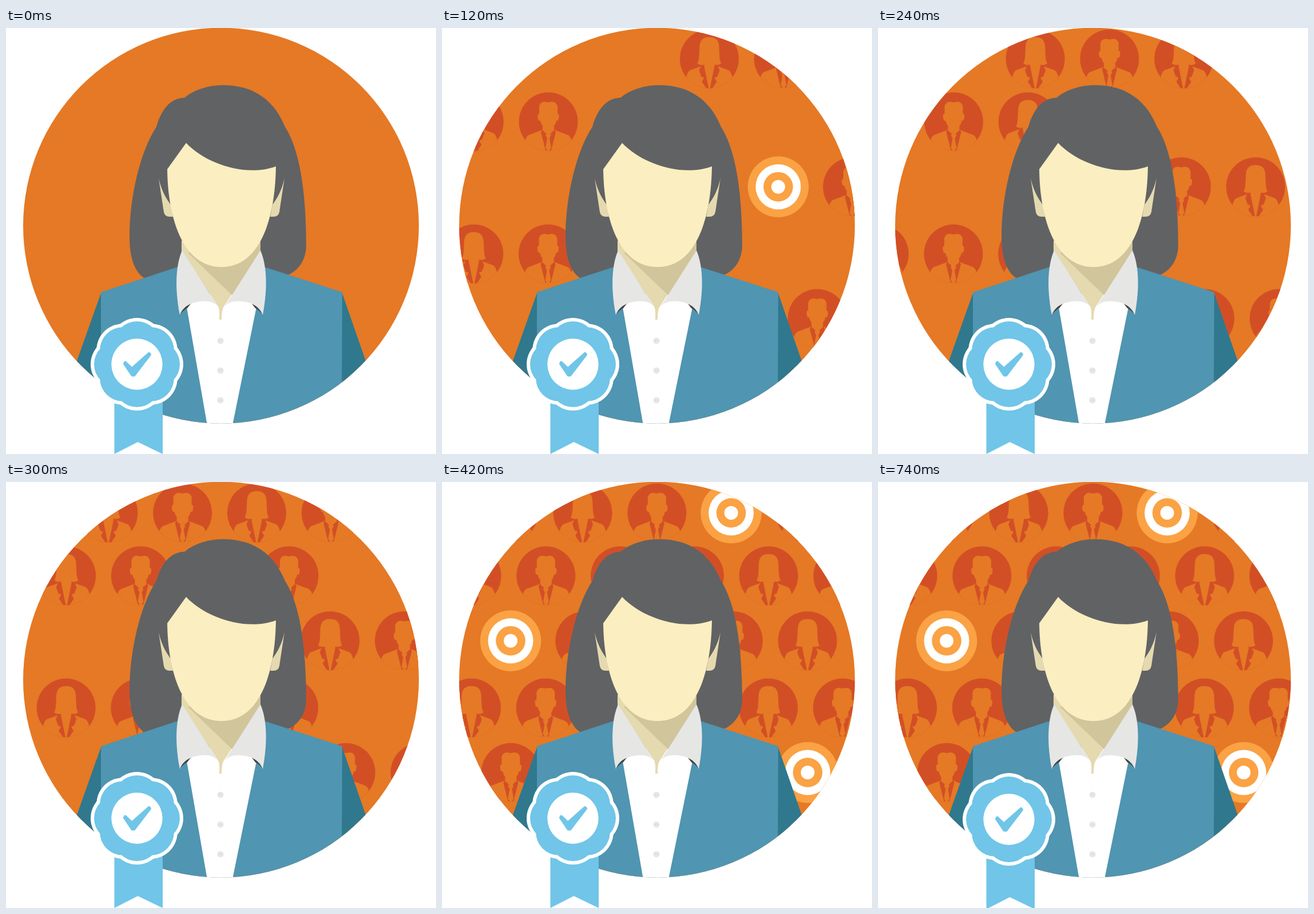
An HTML page with a canvas for the animation above (970 ms loop, 752 px wide and 745 px high).

```html
<!DOCTYPE html>
<html lang="en">
<head>
<meta charset="utf-8">
<title>Verified profile</title>
<style>
html, body { margin: 0; width: 100%; height: 100%; overflow: hidden; background: #fff; }
canvas { display: block; }
</style>
</head>
<body>
<canvas id="stage" width="752" height="745"></canvas>
<script>
const ctx = document.getElementById('stage').getContext('2d');
const LOOP = 970, STEP = 30, SLIDE_STEPS = 14, BOUNCE_START = 590, SPACING = 129.8;
const ORANGE = '#e57925', RED = '#d24f26', AMBER = '#faa244', SKY = '#70c5e8';
const HAIR = '#616264', SKIN = '#fbeec0', SHADE = '#e5d9af', DEEP_SHADE = '#d1c59c';
const BLAZER = '#5095b1', SLEEVE = '#30788e', COLLAR = '#e6e6e5';

// Resting x of the first icon, and travel still to go per step.
const rows = [
  { y: 54, x: -13.5, travel: 48.1, icons: 'wmwmtw' },
  { y: 164, x: 52, travel: -51.5, icons: 'wmwmwm' },
  { y: 277.7, x: 120, travel: 46.8, icons: 'tmwmwm' },
  { y: 395, x: 51.5, travel: -51.5, icons: 'wmwmwm' },
  { y: 508, x: -9.5, travel: 53.6, icons: 'wmwmwt' }
];
const bounce = [-4, -7, -10, -6, -2, 2];

function shape(color, d) {
  ctx.fillStyle = color;
  ctx.fill(new Path2D(d));
}

function disc(color, x, y, r) {
  ctx.fillStyle = color;
  ctx.beginPath();
  ctx.arc(x, y, r, 0, Math.PI * 2);
  ctx.fill();
}

function mirrored(axis, draw) {
  draw();
  ctx.save();
  ctx.translate(axis * 2, 0);
  ctx.scale(-1, 1);
  draw();
  ctx.restore();
}

function man() {
  mirrored(0, () => {
    shape(ORANGE, 'M-1 -34Q-13 -38 -16 -27L-16 -14Q-20 -14 -18 -5Q-17 -1 -14 -2Q-13 4 -10 7L-10 14L-34 23Q-39 25 -41 35L-41 60H1V-34Z');
  });
  shape(RED, 'M-11 14L0 24L11 14L13 18L5 50H-5L-13 18Z');
  shape(ORANGE, 'M0 18L5 23L2 29L5 46L0 52L-5 46L-2 29L-5 23Z');
}

function woman() {
  mirrored(0, () => {
    shape(ORANGE, 'M1 -38Q-16 -39 -17 -22C-18 -8 -17 2 -21 8Q-16 12 -9 10L-9 14L-1 52H1Z');
    shape(ORANGE, 'M-15 13L-34 20Q-38 22 -41 34V60H1V51L-8 14Z');
    shape(RED, 'M-9 13L-15 13L-18 20L-14 31L-9 33L-13 40L-5 52H-1Z');
  });
}

function target() {
  disc(AMBER, 0, 0, 53.3);
  disc('#fff', 0, 0, 39.5);
  disc(AMBER, 0, 0, 25.8);
  disc('#fff', 0, 0, 12);
}

function icon(kind, x, y) {
  ctx.save();
  ctx.translate(x, y);
  if (kind === 't') {
    target();
  } else {
    disc(RED, 0, 0, 51.5);
    ctx.clip();
    kind === 'm' ? man() : woman();
  }
  ctx.restore();
}

function crowd(stepsLeft) {
  for (const row of rows) {
    [...row.icons].forEach((kind, i) =>
      icon(kind, row.x + i * SPACING + row.travel * stepsLeft, row.y));
  }
}

function portrait() {
  shape(HAIR, 'M312 122C330 107 355 100 380 100C435 100 470 128 488 173C512 210 525 280 525 380C525 405 512 424 493 432L377 470L241 437C224 425 216 400 216 365C216 295 235 215 263 173C271 143 288 122 312 122Z');
  shape(SLEEVE, 'M167 461L124 582V700H167ZM587 461L629 582V700H587Z');
  shape(BLAZER, 'M166 462L300 418H452L588 462L587 700H166Z');
  shape('#fff', 'M316 488L330 465H424L438 488L396 695H352Z');
  shape(SHADE, 'M307 372V390L371 487Q374 492 373 510H377Q377 492 381 487L445 390V372Z');
  shape(DEEP_SHADE, 'M318 393L396 468L445 390V372Z');
  mirrored(376.5, () => {
    shape('#414345', 'M304 502Q309 488 324 481L317 490Q309 494 304 502Z');
    shape(COLLAR, 'M308 389C298 412 294 450 304 502C311 483 330 479 342 478C356 477 365 480 371 488Z');
  });
  mirrored(377, () =>
    shape(SHADE, 'M267 263C272 285 280 298 288 309L292 330H286Q278 330 276 322Z'));
  shape(SKIN, 'M282 247L315 201C350 238 420 261 472 242C471 330 446 418 377 418C308 418 283 330 282 247Z');
  for (const y of [547, 599, 651]) {
    disc('#e6e7e8', 375, y, 5.6);
    disc('#d3d5d7', 373, y, 1);
    disc('#d3d5d7', 377, y, 1);
  }
}

function scallop(color, r) {
  for (let i = 0; i < 8; i++) {
    const a = i * Math.PI / 4;
    disc(color, 35 * Math.cos(a), 35 * Math.sin(a), r);
  }
}

function badge(dy) {
  ctx.save();
  ctx.translate(229, 588 + dy);
  shape(SKY, 'M-39.5 52H45V157L1.5 136L-39.5 157Z');
  scallop('#fff', 46);
  scallop(SKY, 40);
  disc('#fff', 0, 0, 44.7);
  const tick = new Path2D('M-20.5 -3L-9 8L21 -18.5L22.5 -17L-5 19H-8L-21.5 -1Z');
  ctx.fillStyle = ctx.strokeStyle = SKY;
  ctx.lineWidth = 5;
  ctx.lineJoin = 'round';
  ctx.fill(tick);
  ctx.stroke(tick);
  ctx.restore();
}

function render(time) {
  const slide = Math.min(SLIDE_STEPS, Math.floor(time / STEP));
  const beat = Math.floor((time - BOUNCE_START) / STEP);
  const lift = beat < 0 ? 0 : bounce[Math.min(beat, bounce.length - 1)];

  ctx.fillStyle = '#fff';
  ctx.fillRect(0, 0, 752, 745);
  ctx.save();
  disc(ORANGE, 376, 345.7, 346);
  ctx.clip();
  crowd(SLIDE_STEPS - slide);
  portrait();
  ctx.restore();
  badge(lift);
}

const start = performance.now();
function tick() {
  render((performance.now() - start + 0.01) % LOOP);
  requestAnimationFrame(tick);
}
tick();
</script>
</body>
</html>
```
